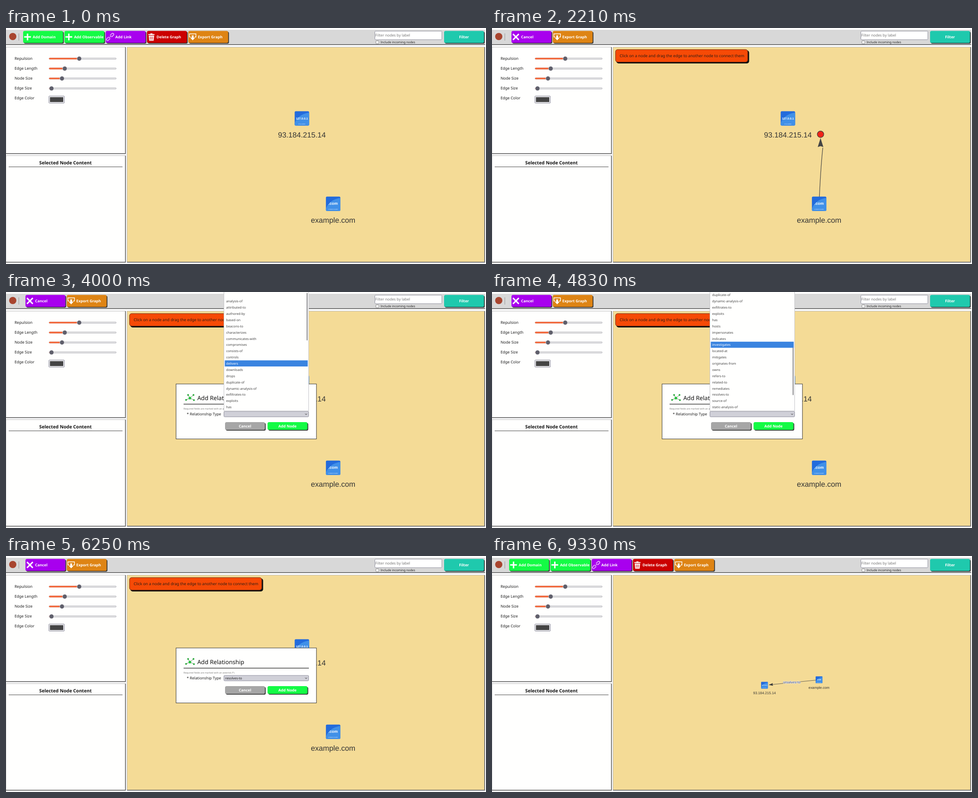
An HTML page for the animation above (9370 ms loop, 1065 px wide and 526 px high).

```html
<!DOCTYPE html>
<html lang="en">
<head>
<meta charset="utf-8">
<title>Linking graph nodes</title>
<style>
  html, body { margin: 0; height: 100%; overflow: hidden; background: #fff; }
  svg { display: block; width: 100vw; height: 100vh; }
  text { font-family: "Noto Sans", sans-serif; text-rendering: geometricPrecision; white-space: pre; }
  .arial, .node text { font-family: "Liberation Sans", Arial, sans-serif; }
  .bold { font-weight: 700; }
  .mid { text-anchor: middle; }
  .icon { fill: none; stroke: #fff; stroke-width: 3.1; }
</style>
</head>
<body>
<svg id="stage" viewBox="0 0 1065 526" xmlns="http://www.w3.org/2000/svg"></svg>
<script>
const LOOP = 9370;
const LINK_MODE = 600, DRAG = 1880, DROP = 2580, MODAL = 2750;
const OPEN = 3420, CHOOSE = 6040, CLOSED = 6250, ADDED = 7250;
const ROW = 13.88, VISIBLE_ROWS = 19;
const OPTIONS = ('|analysis-of|attributed-to|authored-by|based-on|beacons-to|characterizes|' +
  'communicates-with|compromises|consists-of|controls|delivers|downloads|drops|duplicate-of|' +
  'dynamic-analysis-of|exfiltrates-to|exploits|has|hosts|impersonates|indicates|investigates|' +
  'located-at|mitigates|originates-from|owns|refers-to|related-to|remediates|resolves-to|' +
  'source-of|static-analysis-of|targets|uses|variant-of').split('|');

const rect = (x, y, w, h, fill, more = '') =>
  `<rect x="${x}" y="${y}" width="${w}" height="${h}" fill="${fill}" ${more}/>`;
const text = (x, y, size, str, fill = '#1c1c1c', cls = '') =>
  `<text x="${x}" y="${y}" font-size="${size}" fill="${fill}" class="${cls}">${str}</text>`;
const path = (d, more = '') => `<path d="${d}" ${more}/>`;
const group = (id, body, more = '') => `<g id="${id}" ${more}>${body}</g>`;

const ICONS = {
  plus: path('M-7.5 0H7.5M0-7.5V7.5', 'class="icon"'),
  cross: path('M-6.5-6.5L6.5 6.5M-6.5 6.5L6.5-6.5', 'class="icon"'),
  link: `<g class="icon" style="stroke-width:1.1" transform="rotate(-45)">
    <path d="M-2-2.5H-8A2.5 2.5 0 0 0-8 2.5H-2M2-2.5H8A2.5 2.5 0 0 1 8 2.5H2M-4 0H4"/></g>`,
  trash: rect(-7, -6.5, 14, 2.4, '#fff', 'rx="1"') + rect(-2.5, -8, 5, 2, '#fff', 'rx="1"') +
    path('M-6-3H6L5 8.3H-5Z', 'fill="#fff"') +
    path('M-2.8-1V6.3M0-1V6.3M2.8-1V6.3', 'stroke="#c00" stroke-width="1"'),
  save: path('M-4.5 0H-7.2V-7H7.2V0H4.5', 'class="icon" style="stroke-width:1.5"') +
    path('M-2-3.5H2V1.5H5.4L0 7.5L-5.4 1.5H-2Z', 'fill="#fff"')
};

function button(x, y, h, color, label, icon) {
  const shape = (dx, fill) => rect(x + dx, y + dx, 88.5, h, fill, 'rx="3.5"');
  const base = y + h / 2 + 3;
  return shape(1.8, '#3a3a3a') + shape(0, color) + (icon
    ? `<g transform="translate(${x + 9.8} ${y + h / 2})">${ICONS[icon]}</g>` +
      text(x + 21.3, base, 8.3, label, '#fff', 'bold')
    : text(x + 44.2, base, 8.3, label, '#fff', 'bold mid'));
}
const toolButton = (x, color, label, icon) => button(x, 6.5, 26.8, color, label, icon);

function slider(y, label, thumb) {
  return text(19, y + 2.7, 8.6, label) +
    rect(95.5, y - 1.4, 149, 2.8, '#efeff0', 'rx="1.4" stroke="#9c9ca2" stroke-width=".8"') +
    rect(95.5, y - 1.8, thumb - 95, 3.6, '#f4673a', 'rx="1.8"') +
    `<circle cx="${thumb}" cy="${y}" r="5" fill="#5f5f6b" stroke="#fff" stroke-width=".6"/>`;
}

function panel(x, y, w, h, fill) {
  return rect(x, y, w, h, fill) +
    path(`M${x} ${y + h}V${y}H${x + w}`, 'fill="none" stroke="#b8b8b8"') +
    path(`M${x} ${y + h}H${x + w}V${y}`, 'fill="none" stroke="#777" stroke-width="2"');
}

function node(id, label, title, titleSize, caption) {
  return group(id,
    rect(-16, -16, 32, 32, '#236bdc', 'rx="2.5"') +
    path('M-16 11Q-9-9 16-13V13.5Q16 16 13.5 16H-13.5Q-16 16-16 13.5Z', 'fill="#4090e8"') +
    text(0, 2.3, titleSize, title, '#fff', 'bold mid') +
    text(0, 13.6, 2.9, caption, '#d5e6fb', 'mid') +
    text(0, 42.2, 16.6, label, '#343434', 'mid'), 'class="node"');
}

const chrome =
  rect(0, 4, 1063, 33, '#d8d8d8') + rect(0, 36, 1063, 2, '#747474') +
  '<circle cx="15" cy="19" r="8" fill="#a8452f"/>' +
  rect(28, 12, 1, 16, '#999') +
  rect(818.5, 7, 148.5, 19, '#fff', 'rx="1.5" stroke="#8f8f9d"') +
  text(819.6, 19.4, 8.2, 'Filter nodes by label', '#757575') +
  rect(820.8, 28.5, 6.4, 6.4, '#fff', 'rx="1" stroke="#777" stroke-width=".9"') +
  text(831, 34.2, 6.8, 'Include incoming nodes') +
  toolButton(972, '#1fc9ad', 'Filter') +
  panel(0, 42.5, 265, 237.5, '#fffffe') +
  slider(68.3, 'Repulsion', 162.5) + slider(90.4, 'Edge Length', 130.3) +
  slider(112.5, 'Node Size', 124.2) + slider(134.7, 'Edge Size', 101) +
  text(19, 159.4, 8.6, 'Edge Color') +
  rect(95, 151.5, 34.5, 16, '#e9e9ed', 'rx="1.5" stroke="#8f8f9d"') +
  rect(97.5, 154.2, 29.5, 10.8, '#444') +
  panel(0, 284.5, 265, 237.5, '#fffffe') +
  text(132, 303.6, 10.2, 'Selected Node Content', '#111', 'bold mid') +
  rect(6, 309, 252.5, 1, '#444') +
  panel(268.5, 42.5, 793.5, 479.5, '#f4db96');

const normalTools =
  toolButton(38, '#14fb45', 'Add Domain', 'plus') +
  toolButton(129.6, '#14fb45', 'Add Observable', 'plus') +
  toolButton(221.2, '#a800ee', 'Add Link', 'link') +
  toolButton(312.8, '#cb0000', 'Delete Graph', 'trash') +
  toolButton(404.4, '#de8414', 'Export Graph', 'save');

const linkTools =
  toolButton(43.2, '#a800ee', 'Cancel', 'cross') +
  toolButton(134.8, '#de8414', 'Export Graph', 'save') +
  rect(276, 50, 294.5, 29, '#111', 'rx="5"') +
  rect(274, 48, 293.5, 28, '#f64a06', 'rx="5" stroke="#4a1a08" stroke-width=".8"') +
  text(283.3, 65.4, 8.68, 'Click on a node and drag the edge to another node to connect them', '#2a1c16');

const dragEdge =
  path('', 'id="dragLine" fill="none" stroke="#444" stroke-width="1.2"') +
  path('M0 0L-20 6.2L-18 0L-20-6.2Z', 'id="dragArrow" fill="#444"');

const finalEdge =
  path('M725.5 276L622 286.4', 'stroke="#444" stroke-width=".8"') +
  path('M0 0L-9.6 3L-8.6 0L-9.6-3Z', 'fill="#3a3a3a" transform="translate(613.8 287.3) rotate(174.3)"') +
  `<text x="665.3" y="284.4" font-size="7.9" class="arial mid" fill="#34406e"
    stroke="#fff" stroke-width="1.1" paint-order="stroke">resolves-to</text>`;

const leaves = [[399.5, 240.5], [404, 229.5], [416, 229.5], [417, 241]];
const modal =
  rect(377.3, 205, 311.5, 122.5, '#fffffe', 'stroke="#333"') +
  leaves.map(([x, y]) => path(`M408 236.5L${x} ${y}`, 'stroke="#4a7a4a" stroke-width=".9"') +
    `<circle cx="${x}" cy="${y}" r="1.9" fill="#2ba83c"/>`).join('') +
  '<circle cx="408" cy="236.5" r="2.9" fill="#23c23c"/>' +
  text(424.5, 241.2, 13.1, 'Add Relationship', '#111') +
  rect(394, 249.2, 278, 1.4, '#333') +
  text(394, 261.6, 5.2, 'Required fields are marked with an asterisk (*)', '#777') +
  text(401, 275, 8.4, '* Relationship Type') +
  rect(483.5, 266.2, 188, 12, '#d0d0d8', 'rx="1.8" stroke="#8f8f9d"') +
  path('M663.6 271.2L665.8 273.4L668 271.2', 'fill="none" stroke="#222"') +
  group('chosen', text(486.3, 274.9, 7.3, 'resolves-to')) +
  button(486, 290, 17.2, '#a6a6a6', 'Cancel') +
  button(580.3, 290, 17.2, '#14fb45', 'Add Node');

const popup =
  rect(483.5, -1, 188, 266, '#fffffe', 'stroke="#c4c4c8"') +
  rect(485.5, 0, 184, 13.6, '#3a84e0', 'id="hover"') +
  Array.from({ length: VISIBLE_ROWS }, (_, i) =>
    text(488.5, 9.4 + i * ROW, 7.25, '', '#444', 'option')).join('') +
  rect(667.2, 0, 1.8, 106, '#77777c', 'id="thumb" rx=".9"');

const stage = document.getElementById('stage');
stage.innerHTML = chrome + group('normalTools', normalTools) + group('linkTools', linkTools) +
  group('dragEdge', dragEdge) + group('finalEdge', finalEdge) +
  node('ip', '93.184.215.14', '127.0.0.1', 6.4, 'IPV4-ADDR') +
  node('domain', 'example.com', '.com', 8.9, 'DOMAIN-NAME') +
  '<circle id="dot" r="7.2" fill="#f02418" stroke="#3c3c3c" stroke-width="1.2"/>' +
  group('modal', modal) + group('popup', popup);

const $ = id => document.getElementById(id);
const options = [...document.querySelectorAll('.option')];
const show = (id, on) => $(id).setAttribute('display', on ? 'inline' : 'none');
const place = (id, x, y, more) => $(id).setAttribute('transform', `translate(${x} ${y}) ${more}`);
const clamp = v => Math.max(0, Math.min(1, v));
const bezier = (t, a, b, c) => (1 - t) ** 2 * a + 2 * t * (1 - t) * b + t * t * c;

function drawDrag(t) {
  const p = clamp((t - DRAG) / 660);
  const x = bezier(p, 725.7, 767, 656.5), y = bezier(p, 391, 178, 201.5);
  const viaX = 729, viaY = (391 + y) / 2;
  const length = Math.hypot(x - viaX, y - viaY) || 1;
  const ux = (x - viaX) / length, uy = (y - viaY) / length;
  const endX = x - 30 * ux - 5 * uy, endY = y - 30 * uy + 5 * ux;
  $('dragLine').setAttribute('d', `M725.7 391Q${viaX} ${viaY} ${endX} ${endY}`);
  place('dragArrow', x - 8.5 * ux, y - 8.5 * uy, `rotate(${Math.atan2(uy, ux) * 180 / Math.PI})`);
  place('dot', x, y, '');
}

function drawPopup(t) {
  const scroll = t < 4540 ? 0 : t < 4580 ? 4 : t < 4830 ? 7 : 14;
  const hovered = t < 3620 ? 0 : t < 5250 ? Math.round(18 - 10 * clamp((t - 3620) / 550))
    : t < 5750 ? 15 : 16;
  options.forEach((option, i) => {
    option.textContent = OPTIONS[scroll + i];
    option.setAttribute('fill', i === hovered ? '#fff' : '#444');
  });
  $('hover').setAttribute('y', hovered * ROW - 0.3);
  $('thumb').setAttribute('y', 2 + scroll * 8.7);
  $('popup').setAttribute('opacity',
    Math.min(clamp((t - OPEN + 40) / 120), clamp((CLOSED - t) / (CLOSED - CHOOSE))));
}

function render(t) {
  const linking = t >= LINK_MODE && t < ADDED;
  const dragging = t >= DRAG && t < DROP;
  const popupOpen = t >= OPEN && t < CLOSED;
  const added = t >= ADDED;
  show('normalTools', !linking);
  show('linkTools', linking);
  show('dragEdge', dragging);
  show('dot', dragging);
  show('finalEdge', added);
  show('modal', t >= MODAL && t < ADDED);
  show('chosen', t >= CHOOSE);
  show('popup', popupOpen);
  place('ip', ...(added ? [604.6, 288, 'scale(.472)'] : [656.5, 201.5, '']));
  place('domain', ...(added ? [725.6, 275.8, 'scale(.472)'] : [725.8, 391.7, '']));
  if (dragging) drawDrag(t);
  if (popupOpen) drawPopup(t);
}

function tick() {
  render(performance.now() % LOOP);
  requestAnimationFrame(tick);
}
tick();
</script>
</body>
</html>
```
